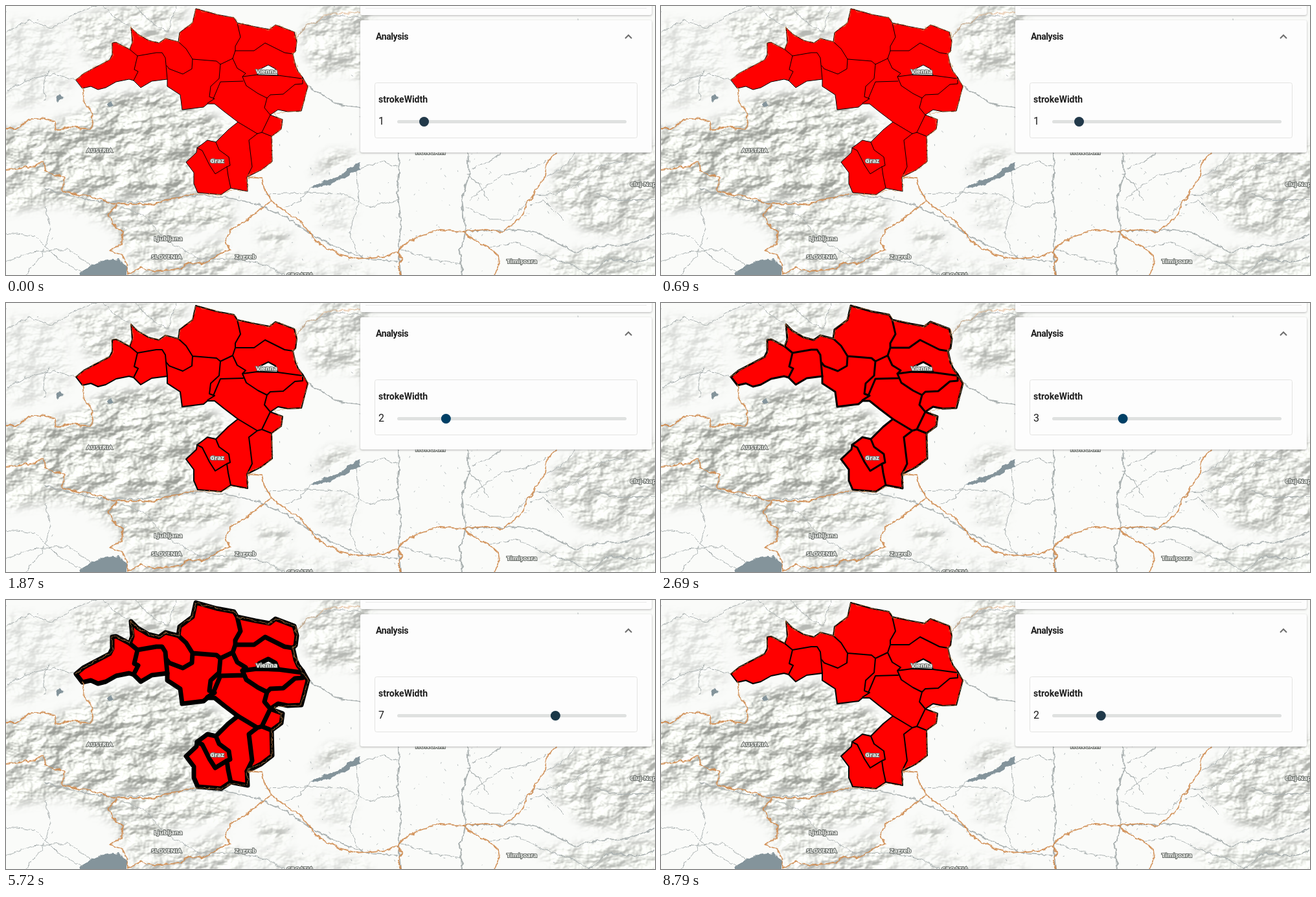
These frames come from a looping animation (1002x415 px, 9580 ms). An HTML page:

```html
<!DOCTYPE html>
<html lang="en">
<head>
<meta charset="utf-8">
<title>Stroke width slider on a map</title>
<style>
html, body { margin: 0; width: 100%; height: 100%; overflow: hidden; background: #fafbf9; }
svg { display: block; width: 100%; height: 100%; }
path { stroke-linejoin: round; }
#labels text {
  font: 700 9.5px "Open Sans", "Noto Sans", sans-serif; text-anchor: middle;
  fill: #f6f7f4; stroke: #6c716d; stroke-width: 2.2px; paint-order: stroke;
}
#panel text { font-family: Roboto, sans-serif; fill: #1d1d1d; }
.card { fill: #fdfdfd; filter: drop-shadow(0 1px 1.5px #7778); }
</style>
</head>
<body>
<svg viewBox="0 0 1002 415">
  <defs>
    <filter id="relief" filterUnits="userSpaceOnUse" x="0" y="0" width="1002" height="415" color-interpolation-filters="sRGB">
      <feTurbulence type="fractalNoise" baseFrequency=".025 .035" numOctaves="4" seed="7"/>
      <feDiffuseLighting surfaceScale="15" lighting-color="#fff"><feDistantLight azimuth="225" elevation="45"/></feDiffuseLighting>
      <feComponentTransfer>
        <feFuncR type="linear" slope=".42" intercept=".615"/>
        <feFuncG type="linear" slope=".42" intercept=".625"/>
        <feFuncB type="linear" slope=".42" intercept=".6"/>
      </feComponentTransfer>
    </filter>
    <filter id="wiggle" filterUnits="userSpaceOnUse" x="0" y="0" width="1002" height="415" color-interpolation-filters="sRGB">
      <feTurbulence type="fractalNoise" baseFrequency=".11" numOctaves="2" seed="3" result="n"/>
      <feDisplacementMap in="SourceGraphic" in2="n" scale="7" xChannelSelector="R" yChannelSelector="G"/>
    </filter>
    <filter id="soft" filterUnits="userSpaceOnUse" x="-60" y="-60" width="1122" height="535"><feGaussianBlur stdDeviation="8"/></filter>
    <mask id="hills" maskUnits="userSpaceOnUse" x="0" y="0" width="1002" height="415">
      <g filter="url(#soft)">
        <path fill="#fff" d="M-30 190L60 185L115 165L150 140L245 128L300 160L345 185L310 280L250 300L150 290L60 282L-30 290Z"/>
        <path fill="#ddd" d="M-30 240L80 270L170 300L290 300L350 300L350 340L270 345L230 370L195 400L165 340L90 305L-30 320Z"/>
        <path fill="#bbb" d="M190 365L260 385L330 360L370 400L350 430L190 430ZM95 20L190 0L280 0L265 45L195 70L130 90Z"/>
        <path fill="#bbb" d="M455 50L480 0L560 -10L560 120L520 100L480 110Z"/>
        <path fill="#ccc" d="M850 250L910 215L1030 215L1030 340L960 355L900 350L840 300Z"/>
        <path fill="#aaa" d="M820 385L900 375L1030 365L1030 430L860 430ZM390 340L440 350L430 380L390 365ZM500 225L545 225L520 250L470 260Z"/>
        <path fill="#555" d="M0 20L90 30L100 130L30 160L-20 140ZM480 290L540 300L530 360L480 330ZM380 385L560 400L560 430L380 430Z"/>
      </g>
    </mask>
  </defs>

  <rect width="1002" height="415" fill="#fafbf9"/>
  <rect width="1002" height="415" filter="url(#relief)" mask="url(#hills)"/>

  <g filter="url(#wiggle)">
    <g fill="#84949b">
      <path d="M470 280L490 271L514 263L529 250L546 242L547 252L526 264L500 274L479 281Z"/>
      <path d="M114 412L128 401L150 393L174 390L188 403L185 418L116 418Z"/>
      <path d="M75 143L83 136L89 141L79 148ZM158 149L164 146L166 154L160 156Z"/>
    </g>
    <g fill="none" stroke="#a9b0b0">
      <path stroke-width="2" d="M466 124L490 138L515 153L547 157M606 226L607 260L604 290L610 330L606 375L609 415M713 226L715 258L704 300L710 348L700 380L705 415"/>
      <path stroke-width="1.6" d="M60 282L130 300L200 303L250 298L300 291L350 297L392 307L432 325L472 352L520 377L560 391L605 394"/>
      <path stroke-width="1.5" d="M705 348L790 345L820 349L850 365L880 380L912 371L960 368L1002 352"/>
      <path d="M0 40L35 22L70 34L105 12L140 0M150 0L170 20L194 33M200 0L220 22L250 40L262 0M0 130L40 112L75 105L108 114M60 145L58 120L65 100M447 50L465 28L482 24L510 14L547 18"/>
      <path d="M180 310L215 325L245 360L300 391L355 390L400 400L430 415M0 350L45 355L80 390L118 412M30 415L55 385L70 345L60 310M0 395L40 380L95 375L130 400"/>
      <path d="M400 290L460 288L520 290L560 310L605 300M547 250L580 240L604 248M470 280L455 300L430 312M540 255L545 300L530 350L545 385M607 375L660 392L705 398"/>
      <path d="M715 300L740 280L765 262L800 255L833 240M710 310L750 330L780 330L815 292L850 290L890 270L920 245L960 238M830 265L860 250L880 226M860 330L830 300L810 308M745 372L790 365L830 385L875 400L900 415"/>
      <path stroke-width="1.3" d="M720 250L745 240L765 226M712 260L730 275L745 300M900 415L930 390L975 395L1002 388M910 290L945 300L1002 298"/>
    </g>
  </g>
  <g id="specks" fill="none" stroke="#b3babb"></g>

  <g fill="none" stroke="#000" stroke-linecap="round" id="districts"></g>

  <g fill="none" stroke="#cf8a4d" stroke-width="1.8" opacity=".9" filter="url(#wiggle)">
    <path id="north" stroke-width="1.2" opacity=".7"/>
    <path stroke-width="1.2" opacity=".7" d="M466 124L460 147L456 162L435 163L413 167L427 175L425 190L410 201L411 240L394 253L372 264L373 286L347 283L332 291L290 290"/>
    <path d="M0 189L16 189L35 176L60 173L74 178L78 192L100 187L131 190L135 178L129 160L121 148L118 126"/>
    <path d="M0 252L20 250L45 246L58 240L60 254L76 261L90 264L87 286L110 291L140 296L172 306L205 305L231 307L241 300L264 297L290 290"/>
    <path d="M173 306L159 321L164 336L181 350L178 368L159 378L180 384L186 398L188 413L210 403L226 409L270 406L282 395L302 398L320 388L345 375L340 362L346 345L370 331L386 318L410 301"/>
    <path d="M375 264L395 266L399 283L410 301L427 315L450 328L465 345L485 368L515 383L540 390L565 388L590 386L604 378L614 368L640 355L670 345L690 347L705 348L740 345L765 348L785 335L797 324L804 306L815 290L830 265L835 240L850 226"/>
    <path stroke-width="2.4" d="M604 378L611 390L605 402L609 415M468 348L486 370"/>
    <path d="M705 348L730 365L745 372L759 385L761 400L754 415"/>
    <path d="M449 48L465 28L480 25L492 12L547 10" opacity=".4"/>
  </g>

  <g id="labels">
    <text x="144.500" y="226">AUSTRIA</text>
    <text x="248" y="389.500">SLOVENIA</text>
    <text x="656" y="229">HUNGARY</text>
    <text x="454" y="418">CROATIA</text>
    <text x="402.500" y="104">Vienna</text>
    <text x="326" y="241.500">Graz</text>
    <text x="250.500" y="362">Ljubljana</text>
    <text x="370" y="390">Zagreb</text>
    <text x="796.500" y="397">Timișoara</text>
    <text x="992" y="277.500">Cluj-Napoca</text>
  </g>

  <g id="panel">
    <rect class="card" x="547" y="-10" width="450" height="24" rx="3"/>
    <path d="M555 3.500H989" stroke="#e8e8e8"/>
    <rect class="card" x="547" y="22" width="450" height="204" rx="3"/>
    <text x="571" y="52" font-size="14" font-weight="700" letter-spacing="-.4">Analysis</text>
    <path d="M956 50L961 45L966 50" fill="none" stroke="#6e6e6e" stroke-width="2" style="stroke-linejoin:miter"/>
    <rect x="569.500" y="118.500" width="405" height="85" rx="3" fill="none" stroke="#e4e4e2"/>
    <text x="575" y="149" font-size="14" font-weight="700">strokeWidth</text>
    <text id="value" x="575" y="183" font-size="16"></text>
    <rect x="604" y="176" width="354" height="5" rx="2.500" fill="#dfe1e0"/>
    <circle id="thumb" cy="178.500" r="7.500"/>
  </g>
</svg>
<script>
const LOOP = 9580;
const $ = id => document.getElementById(id);

// Outline of the red region, split into its northern and southern halves
const north = "M108 114L120 104L141 93L160 83L164 75L164 57L170 56L191 67L195 56L193 33L203 43L220 53L236 57L246 50L266 55L268 41L288 26L293 4L325 13L352 18L357 26L385 32L407 36L416 29L445 40L449 55L447 70L443 74L447 92L451 101L458 110L466 124";
const south = "L460 147L456 162L435 163L420 160L408 168L427 175L425 190L410 201L411 240L394 253L372 264L373 286L347 281L332 291L296 288L290 274L290 257L278 241L294 226L295 219L311 207L324 210L343 191L358 179L337 163L322 151L311 151L305 156L272 160L269 137L249 124L249 113L225 116L208 126L197 115L190 113L170 117L154 126L142 129L131 124L118 127Z";
const hole = "M388 106L391 98L405 91L416 97L420 107Z";
const inner = [
  "M191 67L203 77L198 98L204 101L197 115",
  "M203 77L232 72L241 72L246 80L249 113M248 92L252 97L273 105L287 97L288 82L278 66L266 55",
  "M288 82L325 85L331 90L350 81L354 69L354 62L362 48L357 26",
  "M354 69L383 69L400 57L410 62L430 72L443 74",
  "M350 81L357 96L370 104L365 109L388 106L420 107L457 112",
  "M331 90L329 112L316 124L314 140L322 143L311 150M320 143L331 117L366 116",
  "M365 109L371 123L389 135L403 142L408 137L428 136L446 121L458 120L458 110",
  "M403 142L399 157L408 168L395 195L388 197L358 179M395 195L410 201",
  "M388 197L375 207L380 248L372 264",
  "M295 219L303 223L314 245L323 259L341 248L346 246L344 233L329 222L324 210M341 248L343 262L347 281"
].join("");

const districts = $("districts");
districts.innerHTML =
  `<path d="${north + south + hole}" fill="red" fill-rule="evenodd"/><path d="${inner}"/>`;
$("north").setAttribute("d", north);

// Small ponds and streams scattered over the plain
let seed = 11;
const rand = () => (seed = seed * 16807 % 2147483647) / 2147483647;
let specks = "";
for (let i = 0; i < 170; i++) {
  const wide = i % 3;
  const x = wide ? 430 + rand() * 410 : rand() * 1000;
  const y = wide ? 170 + rand() * 235 : rand() * 415;
  specks += `M${x} ${y}l${rand() * 5 - 2} ${rand() * 5 - 1}`;
}
$("specks").innerHTML = `<path d="${specks}"/>`;

// [start time, value]; the map redraws a little after the slider moves
const sliderSteps = [[0, 1], [1610, 2], [2300, 3], [2950, 4], [3560, 5], [4490, 6], [5100, 7],
  [5850, 6], [5960, 5], [6090, 4], [6230, 3], [6430, 2]];
const strokeSteps = [[0, 1], [1850, 2], [2560, 3], [3250, 4], [3990, 5], [4780, 6], [5400, 7], [6740, 2]];
const thumbSteps = [[0, "#22394a"], [990, "#004066"], [4490, "#1a3848"], [7210, "#20394a"]];
const at = (steps, t) => steps.findLast(([start]) => start <= t)[1];

const start = performance.now();
function draw() {
  const t = (performance.now() - start) % LOOP;
  const value = at(sliderSteps, t);
  $("value").textContent = value;
  $("thumb").setAttribute("cx", 645.5 + 33.8 * (value - 1));
  $("thumb").setAttribute("fill", at(thumbSteps, t));
  districts.setAttribute("stroke-width", at(strokeSteps, t));
  requestAnimationFrame(draw);
}
draw();
</script>
</body>
</html>
```
